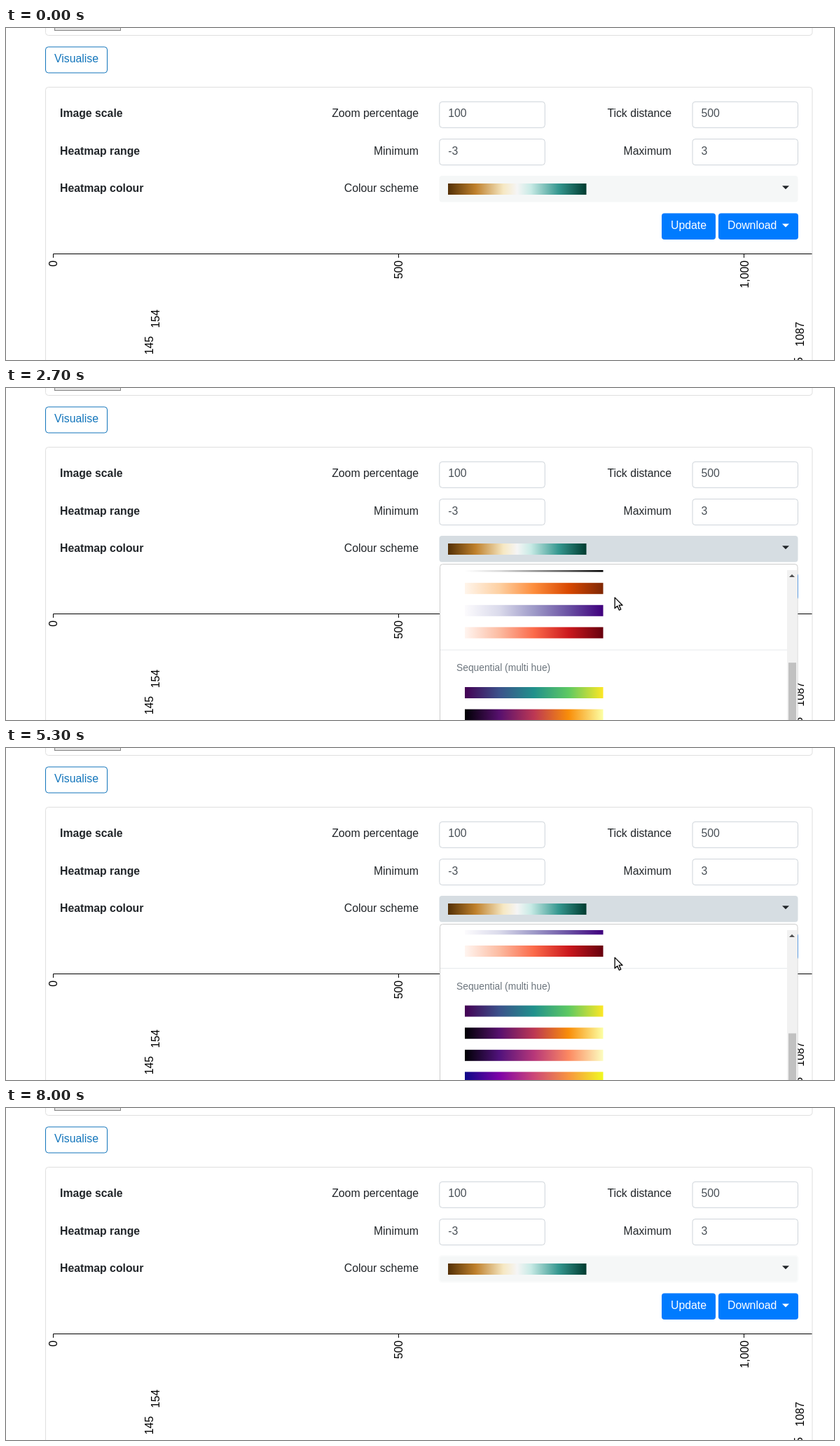
An HTML page for the animation above (8100 ms loop, 1182 by 474 pixels).

```html
<!DOCTYPE html>
<html lang="en">
<head>
<meta charset="utf-8">
<title>Heatmap colour scheme</title>
<style>
  html, body { margin: 0; width: 100%; height: 100%; overflow: hidden; background: #fff; }
  svg { display: block; }
  text { font: 15.8px "Liberation Sans", Arial, sans-serif; fill: #212529; }
  .bold { font-weight: bold; }
  .end { text-anchor: end; }
  .value { fill: #495057; }
  .light { fill: #fff; }
  .axis text { fill: #000; text-anchor: end; }
  .menu-title { font-size: 13.8px; fill: #6c757d; }
  .box { fill: #fff; stroke: #ced4da; }
  .card { fill: #fff; stroke: #dfdfdf; }
</style>
</head>
<body>
<svg id="stage" width="1182" height="474" viewBox="0 0 1182 474">
  <defs id="defs"></defs>
  <rect class="card" x="56.5" y="-40" width="1094.5" height="50.5" rx="4"/>
  <rect x="69.5" y="-20" width="94" height="23.5" fill="#e3e3e3" stroke="#858585"/>
  <rect x="56.5" y="27" width="88" height="37" rx="4" fill="#fff" stroke="#1275bb"/>
  <text x="69" y="49" style="fill:#1275bb">Visualise</text>
  <rect class="card" x="56.5" y="84.5" width="1094.5" height="420" rx="4"/>

  <g id="form"></g>
  <rect id="select" x="618.5" y="211" width="512" height="37.6" rx="4" stroke-width="2"/>
  <rect x="631" y="222" width="197.5" height="16" fill="url(#scheme0)"/>
  <path d="M1108 225.3h10l-5 5z" fill="#212529"/>

  <rect x="936" y="264.5" width="77" height="37.5" rx="4" fill="#007bff"/>
  <text class="light" x="949" y="287">Update</text>
  <rect x="1017" y="264.5" width="114" height="37.5" rx="4" fill="#007bff"/>
  <text class="light" x="1030" y="287">Download</text>
  <path d="M1108 279.5h10l-5 5z" fill="#fff"/>

  <path d="M67.5 328v-5.5H1150.5M560.5 322v6M1053.5 322v6" fill="none" stroke="#000"/>
  <g id="axis" class="axis"></g>

  <g id="menu">
    <rect x="619.5" y="251.5" width="510.5" height="260" rx="4" fill="#fff" stroke="#ccc"/>
    <svg x="620" y="260" width="495" height="214"><g id="list"></g></svg>
    <rect x="1115" y="260" width="14.5" height="214" fill="#f1f1f1"/>
    <path id="up" d="M1118 270h8l-4-4z"/>
    <rect id="thumb" x="1117" width="11" height="89" fill="#c1c1c1"/>
  </g>

  <g id="cursor" stroke="#000" stroke-width="1.3" stroke-linejoin="round" fill="#fff">
    <path id="arrow" d="M.6 .6V16l3.6-3.3 2.6 5.9 2.5-1.1-2.6-5.8h4.9z"/>
    <path id="hand" d="M-1.5 2Q0 0 1.7 1.8L2.4 6 9 7Q11.3 7.6 11.3 10V15.5H1L-3.6 11Q-4 8.6-.3 9.6z"/>
  </g>
</svg>
<script>
const el = id => document.getElementById(id);
const add = (id, markup) => el(id).insertAdjacentHTML("beforeend", markup);

const diverging = [
  "543005 bf812d f6e8c3 f5f5f5 c7eae5 35978f 003c30",
  "40004b 9970ab e7d4e8 f7f7f7 d9f0d3 5aae61 00441b",
  "8e0152 de77ae fde0ef f7f7f7 e6f5d0 7fbc41 276419",
  "2d004b 8073ac d8daeb f7f7f7 fee0b6 e08214 7f3b08",
  "67001f d6604d fddbc7 f7f7f7 d1e5f0 4393c3 053061",
  "67001f d6604d fddbc7 f7f7f7 d1e5f0 4393c3 053061",
  "a50026 f46d43 fee090 ffffbf e0f3f8 74add1 313695",
  "a50026 f46d43 fee08b ffffbf d9ef8b 66bd63 006837",
  "9e0142 f46d43 fee08b ffffbf e6f598 66c2a5 5e4fa2"
];
const singleHue = [
  "f7fbff c6dbef 6baed6 2171b5 08306b",
  "f7fcf5 c7e9c0 74c476 238b45 00441b",
  "ffffff d9d9d9 969696 525252 000000",
  "fff5eb fdd0a2 fd8d3c d94801 7f2704",
  "fcfbfd dadaeb 9e9ac8 6a51a3 3f007d",
  "fff5f0 fcbba1 fb6a4a cb181d 67000d"
];
const multiHue = [
  "440154 3b528b 21918c 5ec962 fde725",
  "000004 57106e bc3754 f98e09 fcffa4",
  "000004 51127c b73779 fc8961 fcfdbf",
  "0d0887 7e03a8 cc4778 f89540 f0f921",
  "6e40aa d23ea7 ff5e63 efa72f aff05b",
  "6e40aa 417de0 1ac7c2 40f373 aff05b",
  "000000 163d4e 54792f d07e93 c1caf3 ffffff",
  "f7fcfd ccece6 66c2a4 238b45 00441b",
  "f7fcfd bfd3e6 8c96c6 88419d 4d004b",
  "f7fcf0 ccebc5 7bccc4 2b8cbe 084081",
  "fff7ec fdd49e fc8d59 d7301f 7f0000",
  "fff7fb d0d1e6 67a9cf 02818a 014636",
  "fff7fb d0d1e6 74a9cf 0570b0 023858",
  "f7f4f9 d4b9da df65b0 ce1256 67001f",
  "fff7f3 fcc5c0 f768a1 ae017e 49006a"
];
const divergingStops = [0, .2, .4, .5, .6, .8, 1];

// Form rows
const label = (text, x, y, cls) => add("form", `<text class="${cls}" x="${x}" y="${y}">${text}</text>`);
const input = (text, x, y) => {
  add("form", `<rect class="box" x="${x}" y="${y - 22}" width="150.5" height="37" rx="4"/>`);
  label(text, x + 12.5, y, "value");
};
[["Image scale", "Zoom percentage", "100", "Tick distance", "500"],
 ["Heatmap range", "Minimum", "-3", "Maximum", "3"],
 ["Heatmap colour", "Colour scheme"]].forEach(([title, left, leftValue, right, rightValue], i) => {
  const y = 127.3 + i * 53.3;
  label(title, 77, y, "bold");
  label(left, 589, y, "end");
  if (!right) return;
  input(leftValue, 618.8, y);
  label(right, 950, y, "end");
  input(rightValue, 980, y);
});

// Upright axis and position labels
[["0", 73, 332], ["500", 566, 332], ["1,000", 1059.5, 332], ["154", 219, 402],
 ["145", 210, 440], ["1087", 1139, 419.5], ["1075", 1137, 470]].forEach(([text, x, y]) =>
  add("axis", `<text transform="translate(${x} ${y}) rotate(-90)">${text}</text>`));

// Menu contents, in page coordinates at scroll position 0
const rowHeight = 31.6;
let rowY = 311.6, count = 0;
add("list", '<rect x="620" y="296" width="495" height="31.6" fill="#007bff"/>');
[["Diverging", diverging], ["Sequential (single hue)", singleHue],
 ["Sequential (multi hue)", multiHue]].forEach(([title, schemes], group) => {
  if (group) {
    rowY += 54;
    add("list", `<path d="M620 ${rowY - 61}H1115" stroke="#e6e9ec"/>`);
  }
  add("list", `<text class="menu-title" x="643" y="${rowY - 30.6}">${title}</text>`);
  for (const scheme of schemes) {
    const colours = scheme.split(" ");
    const stops = colours.map((c, i) => {
      const offset = colours.length === 7 ? divergingStops[i] : i / (colours.length - 1);
      return `<stop offset="${offset}" stop-color="#${c}"/>`;
    });
    add("defs", `<linearGradient id="scheme${count}">${stops.join("")}</linearGradient>`);
    add("list", `<rect x="655" y="${rowY - 8}" width="197.5" height="16" fill="url(#scheme${count++})"/>`);
    rowY += rowHeight;
  }
});

// Linear interpolation through [time, value] keys
function track(keys, t) {
  const next = keys.findIndex(key => key[0] > t);
  if (next < 0) return keys[keys.length - 1][1];
  if (!next) return keys[0][1];
  const [t0, v0] = keys[next - 1], [t1, v1] = keys[next];
  return v0 + (v1 - v0) * (t - t0) / (t1 - t0);
}

const scrollKeys = [[1600, 0], [1900, 105], [2300, 325], [2500, 325], [2700, 458.6], [3100, 700],
  [3600, 700], [4000, 875], [4200, 875], [4800, 577], [5200, 577], [5300, 518], [6000, 0]];
const cursorX = [[1100, 877], [1500, 868.5], [6500, 868.5], [6700, 877]];
const cursorY = [[400, 178], [600, 219.5], [1100, 219.5], [1500, 298.5], [6500, 298.5], [6700, 219.5]];
// Shades of the select: 0 idle, 1 hovered, 1.4 pressed
const shadeKeys = [[400, 0], [600, 1], [700, 1], [900, 1.4], [7000, 1.4], [7300, 1], [7900, 1], [8000, 0]];

const show = (id, on) => el(id).setAttribute("display", on ? "inline" : "none");
const move = (id, x, y) => el(id).setAttribute("transform", `translate(${x} ${y})`);
const within = (t, from, to) => t >= from && t < to;

function draw(now) {
  const t = Math.floor(now % 8100 / 100) * 100;
  const scroll = track(scrollKeys, t), x = track(cursorX, t), y = track(cursorY, t);
  const shade = track(shadeKeys, t), open = within(t, 900, 7100);

  const fill = `rgb(${245 - shade * 22},${247 - shade * 18.5},${247 - shade * 15})`;
  el("select").setAttribute("fill", fill);
  el("select").setAttribute("stroke", t >= 8000 ? "#fafbfb" : "none");

  show("menu", open);
  move("list", -620, -260 - scroll);
  el("thumb").setAttribute("y", 274.3 + scroll * .257);
  el("up").setAttribute("fill", scroll ? "#505050" : "#a3a3a3");

  const overTitle = within(t, 2300, 2800) || within(t, 4800, 5400);
  const arrow = y < 211 || within(y, 249, 296) || overTitle;
  show("cursor", within(t, 400, 8000));
  show("arrow", arrow);
  show("hand", !arrow);
  move("cursor", x, y);
}

const start = performance.now();
(function tick() {
  draw(performance.now() - start);
  requestAnimationFrame(tick);
})();
</script>
</body>
</html>
```
